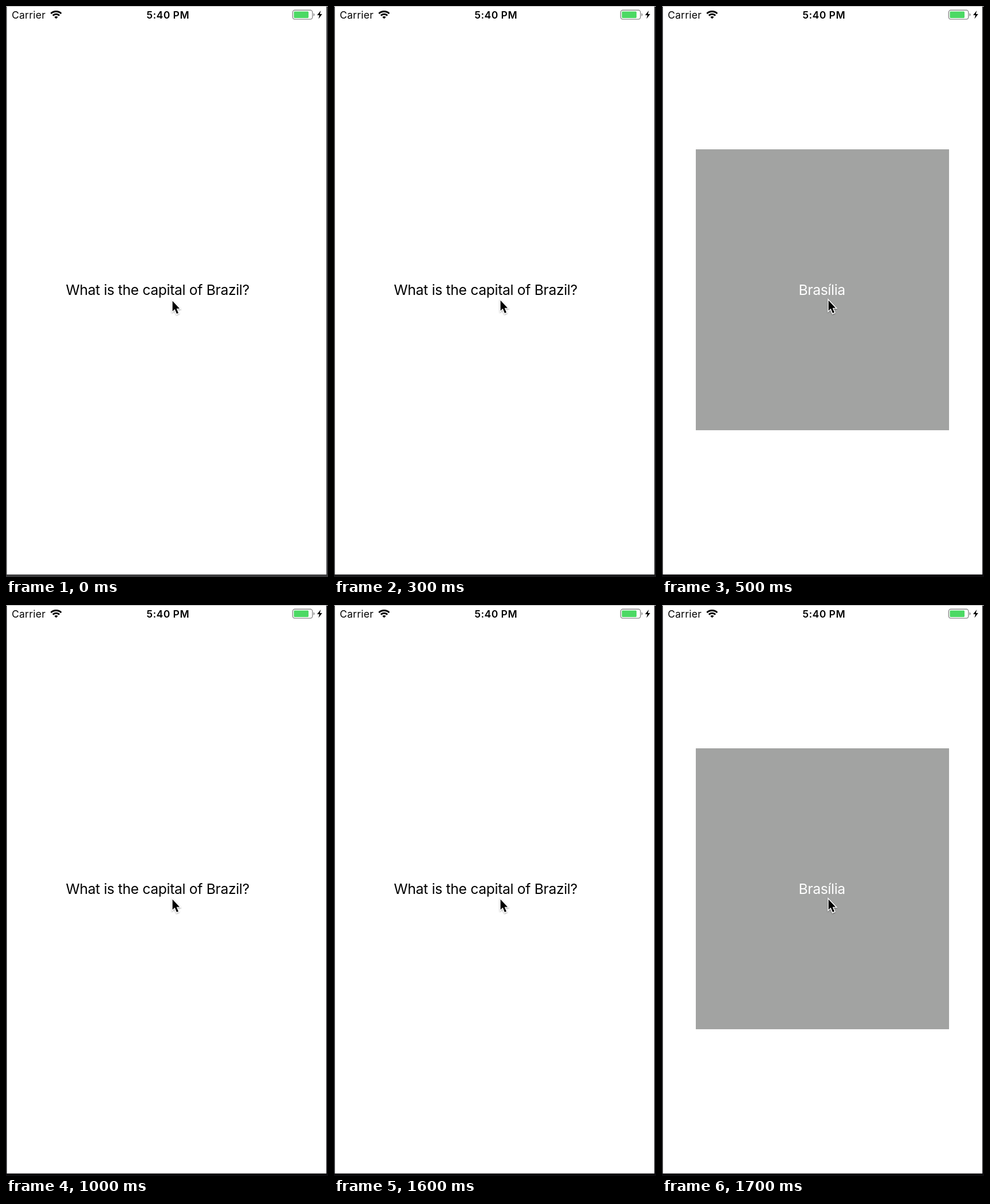
Write an HTML page that moves like this. It is 562 px wide and 996 px high and loops after 2000 ms.

```html
<!DOCTYPE html>
<html lang="en">
<head>
<meta charset="utf-8">
<title>Flash card</title>
<style>
  html, body { margin: 0; width: 100%; height: 100%; overflow: hidden; background: #0c0b0e; }
  svg { display: block; width: 562px; height: 996px; }
  text { font-family: Inter, Roboto, "Liberation Sans", sans-serif; white-space: pre; }
  .card { font-size: 24.6px; letter-spacing: -0.3px; }
  .status { font-size: 17.5px; }
</style>
</head>
<body>
<svg viewBox="0 0 562 996">
  <defs>
    <filter id="shadow" x="-50%" y="-50%" width="200%" height="200%">
      <feDropShadow dx="0" dy="1.2" stdDeviation="1.3" flood-color="#000" flood-opacity="0.38"/>
    </filter>
  </defs>
  <rect id="bezel" width="562" height="996"/>
  <rect x="1.4" width="557.8" height="991.6" fill="#fff"/>
  <rect width="562" height="1" fill="#b9b9b9"/>

  <!-- status bar -->
  <text class="status" x="10" y="21.6" letter-spacing="0.25">Carrier</text>
  <g fill="none" stroke="#000" stroke-width="2.9">
    <path d="M78.4 13.2A12.8 12.8 0 0 1 96.4 13.2"/>
    <path d="M81.8 16.6A8.1 8.1 0 0 1 93.2 16.6"/>
  </g>
  <path d="M87.5 22.3L84.4 19.2A4.4 4.4 0 0 1 90.6 19.2Z"/>
  <text class="status" x="245.2" y="21.6" font-weight="600" letter-spacing="0.5">5:40 PM</text>
  <rect x="500.3" y="7.3" width="34.6" height="15.8" rx="3.8" fill="#fff" stroke="#8c8c8c" stroke-width="1.4"/>
  <rect x="502.4" y="9.5" width="25.6" height="11.4" rx="1.4" fill="#4cd964"/>
  <path d="M536.6 12.6Q538.6 13.4 538.6 15.2T536.6 17.8Z" fill="#8c8c8c"/>
  <path d="M549.4 8L543 16H547L545.4 22.4L551.8 14H547.8Z"/>

  <text id="question" class="card" x="104.6" y="504">What is the capital of Brazil?</text>
  <g id="answer">
    <rect x="59" y="250" width="442" height="490" fill="#a2a3a2"/>
    <text class="card" x="238.4" y="504" fill="#fff">Brasília</text>
  </g>

  <g id="cursor" filter="url(#shadow)">
    <path d="M290.6 513.6V531.4L294.6 527.8L297.9 535.8L300.9 534.5L297.6 526.7H303Z"
          stroke="#fff" stroke-width="2.8" paint-order="stroke"/>
  </g>
</svg>
<script>
  const LOOP = 2000;
  const steps = [
    { at: 0,    bezel: "#39393b", dy: 1, answer: false },
    { at: 100,  bezel: "#39393b", dy: 0, answer: false },
    { at: 300,  bezel: "#1c1c1e", dy: 0, answer: false },
    { at: 400,  bezel: "#0c0b0e", dy: 0, answer: false },
    { at: 500,  bezel: "#0c0b0e", dy: 0, answer: true },
    { at: 1000, bezel: "#0c0b0e", dy: 0, answer: false },
    { at: 1700, bezel: "#0c0b0e", dy: 0, answer: true }
  ];
  const get = id => document.getElementById(id);
  const show = (id, on) => get(id).setAttribute("visibility", on ? "visible" : "hidden");
  const start = performance.now();
  let current;

  function draw() {
    const t = (performance.now() - start) % LOOP;
    const step = steps.filter(s => s.at <= t).pop();
    if (step !== current) {
      current = step;
      get("bezel").setAttribute("fill", step.bezel);
      get("cursor").setAttribute("transform", `translate(0 ${step.dy})`);
      show("answer", step.answer);
      show("question", !step.answer);
    }
    requestAnimationFrame(draw);
  }
  draw();
</script>
</body>
</html>
```
